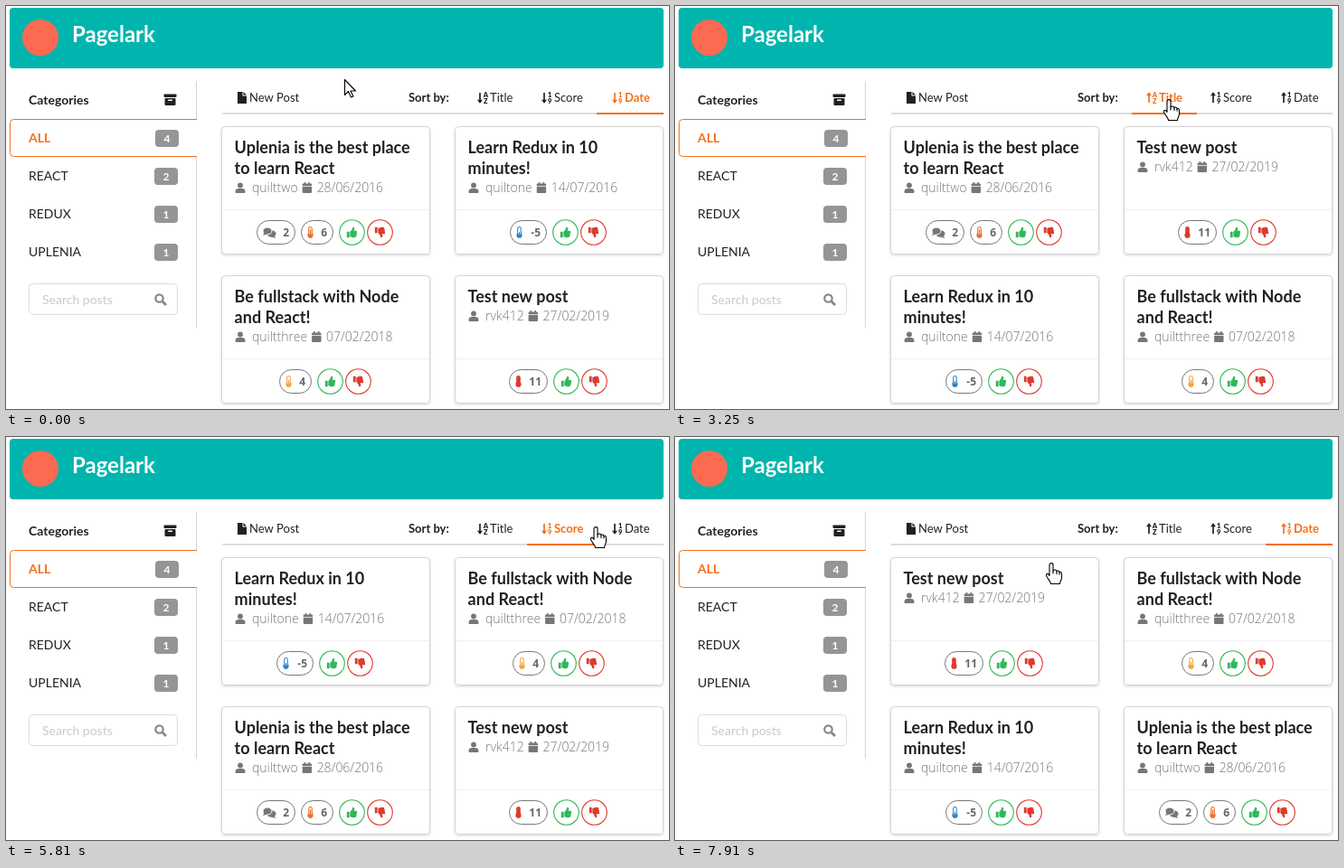
An HTML page with a canvas that plays this animation: 733 by 446 pixels, repeating every 7.99 s.

```html
<!DOCTYPE html>
<html lang="en">
<head>
<meta charset="utf-8">
<title>Post board</title>
<style>
html, body { margin: 0; width: 100%; height: 100%; overflow: hidden; background: #fff; }
canvas { display: block; width: 733px; height: 446px; }
</style>
</head>
<body>
<canvas id="stage"></canvas>
<script>
const W = 733, H = 446, LOOP = 7990;
const canvas = document.getElementById('stage');
const ctx = canvas.getContext('2d');
const ratio = window.devicePixelRatio || 1;
canvas.width = W * ratio;
canvas.height = H * ratio;

const ORANGE = '#f2711c', TEAL = '#00b5ad', INK = '#212121', LINE = '#d4d4d5';
const GREEN = '#2fb955', RED = '#de3a2e', GREY = '#767676';

const posts = [
  { lines: ['Uplenia is the best place', 'to learn React'], user: 'quilttwo', date: '28/06/2016', day: 20160628, score: 6, heat: '#e8702a', level: 0.75, comments: 2 },
  { lines: ['Learn Redux in 10', 'minutes!'], user: 'quiltone', date: '14/07/2016', day: 20160714, score: -5, heat: '#2b83c9', level: 0.4 },
  { lines: ['Be fullstack with Node', 'and React!'], user: 'quiltthree', date: '07/02/2018', day: 20180207, score: 4, heat: '#f2a440', level: 0.55 },
  { lines: ['Test new post'], user: 'rvk412', date: '27/02/2019', day: 20190227, score: 11, heat: RED, level: 1 }
];
const sortKeys = { title: p => p.lines[0], score: p => p.score, date: p => p.day };

const tabs = [
  { key: 'title', label: 'Title', marks: 'AZ', x: 521, from: 505, to: 577 },
  { key: 'score', label: 'Score', marks: '19', x: 592, from: 576, to: 654 },
  { key: 'date', label: 'Date', marks: '19', x: 670, from: 653, to: 727 }
];

// start time, sort key, descending
const sorts = [
  [0, 'date', false], [2550, 'title', false], [3250, 'title', true],
  [4570, 'score', true], [5350, 'score', false],
  [6590, 'date', false], [7280, 'date', true]
];
// mouse button down, button up, key, time the tab reacts
const presses = [
  [2310, 2400, 'title', 2550], [3010, 3180, 'title', 3250],
  [4340, 4490, 'score', 4570], [5110, 5280, 'score', 5350],
  [6360, 6510, 'date', 6590], [7050, 7200, 'date', 7280]
];
// first step, last step, step count, waypoints
const moves = [
  [150, 930, 11, [[375, 82], [550, 99]]],
  [1000, 1780, 11, [[550, 99], [536, 104], [604, 98], [659, 97], [573, 106]]],
  [1850, 1930, 2, [[573, 106], [547, 104]]],
  [3480, 3940, 7, [[547, 104], [612, 100]]],
  [4810, 4880, 2, [[612, 100], [615, 99]]],
  [5580, 6130, 8, [[615, 99], [653, 100], [685, 101]]],
  [7600, 7910, 5, [[685, 101], [417, 140]]]
];

const thumb = new Path2D('M0 224H128V512H0Z M160 235C200 195 220 160 250 125C280 95 275 0 312 0C350 0 384 20 384 81C384 120 358 148 350 176H450C490 176 512 205 512 234C512 255 505 272 492 284C500 310 498 340 483 363C490 395 482 420 467 438C470 500 430 512 345 512C260 512 220 465 160 464Z');
const hand = new Path2D('M-2.5 14V2C-2.5-.5 1.5-.5 1.5 2V8.5C2.5 7 5.5 7 5.5 9.5C6 8 8.5 8.2 8.5 10.5C9.5 9 11 10 11 12V16C11 19 9 20 9 23H-1C-1 20-6 16-6 13.5C-6 11-3.5 11.5-2.5 14Z');
const knuckles = new Path2D('M1.5 8V12M5.5 9.5V12.5M8.5 10.5V13');
const arrow = new Path2D('M0 0V17L4 13L7 19.5L9.5 18.5L6.5 12.5H12Z');

function text(str, x, y, size, color, weight = 400, align = 'left', family = 'Lato') {
  ctx.font = `${weight} ${size}px "${family}", sans-serif`;
  ctx.fillStyle = color;
  ctx.textAlign = align;
  ctx.fillText(str, x, y);
  return ctx.measureText(str).width;
}

function box(x, y, w, h, color) {
  ctx.fillStyle = color;
  ctx.fillRect(x, y, w, h);
}

function round(x, y, w, h, r, fill, stroke) {
  ctx.beginPath();
  ctx.roundRect(x, y, w, h, r);
  paint(fill, stroke);
}

function circle(x, y, r, fill, stroke) {
  ctx.beginPath();
  ctx.arc(x, y, r, 0, Math.PI * 2);
  paint(fill, stroke);
}

function paint(fill, stroke) {
  if (fill) { ctx.fillStyle = fill; ctx.fill(); }
  if (stroke) { ctx.strokeStyle = stroke; ctx.stroke(); }
}

function poly(points, fill, stroke) {
  ctx.beginPath();
  points.forEach(([x, y]) => ctx.lineTo(x, y));
  paint(fill, stroke);
}

function at(x, y, draw) {
  ctx.save();
  ctx.translate(x, y);
  draw();
  ctx.restore();
}

function fileIcon() {
  poly([[0, 0], [5.5, 0], [5.5, 4.5], [10, 4.5], [10, 13], [0, 13]], INK);
  poly([[6.5, 0], [10, 3.5], [6.5, 3.5]], INK);
}

function archiveIcon() {
  round(0, 0, 14, 3.5, 1, INK);
  round(1, 4.5, 12, 8, 1, INK);
  round(4.5, 6, 5, 1.5, 0.7, '#fff');
}

function userIcon() {
  circle(5.5, 3, 2.9, GREY);
  round(0, 6.5, 11, 5, [3.5, 3.5, 1, 1], GREY);
}

function calendarIcon() {
  box(2, 0, 1.6, 3, GREY);
  box(6.8, 0, 1.6, 3, GREY);
  round(0, 1.5, 10.4, 2.5, [1, 1, 0, 0], GREY);
  round(0, 4.7, 10.4, 7.3, [0, 0, 1, 1], GREY);
}

function commentsIcon() {
  ctx.beginPath();
  ctx.ellipse(9.5, 7, 5, 3.8, 0, 0, Math.PI * 2);
  paint(GREY);
  poly([[12, 9], [14.5, 12], [9, 10.5]], GREY);
  ctx.beginPath();
  ctx.ellipse(5, 4, 5, 4, 0, 0, Math.PI * 2);
  paint(GREY, '#fff');
  poly([[1.5, 6], [0, 9], [5, 7.5]], GREY);
}

function searchIcon() {
  ctx.lineWidth = 2.2;
  circle(5, 5, 4.2, null, '#7f8b8e');
  ctx.lineWidth = 2.8;
  poly([[8.5, 8.5], [12.5, 12.5]], null, '#7f8b8e');
}

function thermometer(color, level) {
  round(1.2, 0, 4.6, 10, 2.3, color);
  circle(3.5, 9.7, 3.1, color);
  if (level < 1) {
    round(2.3, 1.1, 2.4, 8, 1.2, '#fff');
    const top = 9.5 - 8 * level;
    box(2.9, top, 1.2, 10 - top, color);
  }
}

function sortIcon(x, marks, up, color) {
  at(x, 95, () => {
    ctx.lineWidth = 1.7;
    poly([[3, 1], [3, 12]], null, color);
    poly(up ? [[0, 4.2], [3, 0.2], [6, 4.2]] : [[0, 8.8], [3, 12.8], [6, 8.8]], color);
  });
  text(marks[0], x + 9.3, 101, 7.5, color, 900, 'center');
  text(marks[1], x + 9.3, 108, 7.5, color, 900, 'center');
}

function drawHeader() {
  round(4, 2, 723, 67, 4, TEAL);
  circle(38, 35, 20, '#fb6a51');
  text('Pagelark', 73, 40, 24, '#fff', 700);
}

function drawSidebar() {
  box(210, 83, 1, 42, LINE);
  box(210, 167, 1, 189, LINE);
  text('Categories', 25, 109, 14, INK, 700);
  at(174.5, 97.5, archiveIcon);

  ctx.lineWidth = 1;
  ctx.beginPath();
  ctx.moveTo(211, 125.5);
  ctx.arcTo(4.5, 125.5, 4.5, 166.5, 4);
  ctx.arcTo(4.5, 166.5, 211, 166.5, 4);
  ctx.lineTo(211, 166.5);
  paint(null, ORANGE);

  [['ALL', 4], ['REACT', 2], ['REDUX', 1], ['UPLENIA', 1]].forEach(([name, count], i) => {
    const y = 146 + i * 42;
    const left = i ? 164 : 165;
    text(name, 25, y + 5, 14, i ? INK : ORANGE, i ? 400 : 700);
    round(left, y - 9, 26, 19, 4, '#949596');
    text(count, left + 13, y + 5, 12, '#fff', 700, 'center');
  });

  ctx.lineWidth = 1;
  round(25.5, 307.5, 164, 34, 4, '#fff', '#dcdcdd');
  text('Search posts', 40, 330, 14, '#c9c9c9');
  at(164.5, 318.5, searchIcon);
}

function drawMenu(t, start, active, up) {
  at(256, 95, fileIcon);
  text('New Post', 269, 106, 13, INK);
  text('Sort by:', 445, 106, 13, INK, 700);
  box(239, 118, 488, 2, '#dededf');

  const fading = start > 0 && t - start < 75 && active !== keyBefore(start);
  for (const tab of tabs) {
    const on = tab.key === active;
    const held = presses.some(p => p[2] === tab.key && t >= p[0] && t < p[3]);
    const color = !on ? INK : fading ? '#cb6a2c' : ORANGE;
    sortIcon(tab.x, tab.marks, up, color);
    text(tab.label, tab.x + 14, 106, 13, color, on ? 700 : 400);
    if (on || held) box(tab.from, 118, tab.to - tab.from, 2, on ? ORANGE : '#b3b3b4');
  }
}

function keyBefore(time) {
  return sorts.filter(s => s[0] < time).pop()[1];
}

function drawPill(x, y, w, value) {
  ctx.lineWidth = 1;
  round(x + 0.5, y - 12.5, w - 1, 26, 13, '#fff', GREY);
  text(value, x + w - 7, y + 5, 12, '#666', 700, 'right', 'Open Sans');
}

function drawVote(x, y, color, flip) {
  ctx.lineWidth = 1.1;
  circle(x, y + 0.5, 13.8, '#fff', color);
  at(x, y + 0.5, () => {
    ctx.scale(11.4 / 512, (flip ? -11.4 : 11.4) / 512);
    ctx.translate(-256, -256);
    ctx.fillStyle = color;
    ctx.fill(thumb);
  });
}

function drawMeta(post, x, y) {
  const write = (str, left) => text(str, left, y, 14, GREY, 300, 'left', 'Open Sans');
  at(x, y - 10.5, userIcon);
  const end = x + 18.5 + write(post.user, x + 18.5);
  at(end + 5, y - 11, calendarIcon);
  write(post.date, end + 21);
}

function drawCard(post, x, y) {
  ctx.save();
  ctx.shadowColor = LINE;
  ctx.shadowBlur = 3 * ratio;
  ctx.shadowOffsetY = ratio;
  round(x, y, 231, 142, 4, '#fff');
  ctx.restore();
  ctx.lineWidth = 1;
  round(x + 0.5, y + 0.5, 230, 141, 4, '#fff', LINE);
  box(x + 1, y + 92, 229, 1, '#f0f0f0');

  post.lines.forEach((line, i) => text(line, x + 14.6, y + 30 + i * 23, 18, INK, 700));
  drawMeta(post, x + 15.5, y + 27 + post.lines.length * 23);

  const mid = y + 117;
  const scoreWidth = { '-5': 41, 11: 43 }[post.score] || 36;
  const extra = post.comments ? 49 : 0;
  let left = Math.round(x + 114.5 - (scoreWidth + extra + 66) / 2);
  if (extra) {
    drawPill(left, mid, 43, post.comments);
    at(left + 7, mid - 5, commentsIcon);
    left += extra;
  }
  drawPill(left, mid, scoreWidth, post.score);
  at(left + 7, mid - 6, () => thermometer(post.heat, post.level));
  left += scoreWidth;
  drawVote(left + 20.5, mid, GREEN, false);
  drawVote(left + 51.5, mid, RED, true);
}

function drawCards(key, down) {
  const value = sortKeys[key];
  const list = [...posts].sort((a, b) => value(a) < value(b) ? -1 : 1);
  if (down) list.reverse();
  list.forEach((post, i) => drawCard(post, 238 + (i % 2) * 258, 133 + (i >> 1) * 165));
}

function pointerAt(t) {
  let pos = moves[0][3][0];
  for (const [from, to, count, path] of moves) {
    if (t < from) break;
    const step = Math.min(count, Math.floor((t - from) / (to - from) * (count - 1) + 0.08) + 1);
    const u = step / count;
    const p = (path.length > 2 ? u : u * u * (3 - 2 * u)) * (path.length - 1);
    const i = Math.min(path.length - 2, Math.floor(p));
    pos = path[i].map((v, k) => Math.round(v + (path[i + 1][k] - v) * (p - i)));
  }
  return pos;
}

function drawPointer(t) {
  const [x, y] = pointerAt(t);
  if (presses.some(p => t >= p[0] && t < p[1])) {
    ctx.lineWidth = 1;
    circle(x, y, 11, null, '#000');
    circle(x, y, 10, null, '#fff');
  }
  at(x - 0.5, y - 0.5, () => {
    ctx.lineWidth = 1.1;
    ctx.lineJoin = 'round';
    ctx.fillStyle = '#fff';
    ctx.strokeStyle = '#000';
    const shape = x >= 505 || t > 7500 ? hand : arrow;
    ctx.fill(shape);
    ctx.stroke(shape);
    if (shape === hand) ctx.stroke(knuckles);
  });
}

function render(t) {
  ctx.setTransform(ratio, 0, 0, ratio, 0, 0);
  box(0, 0, W, H, '#fff');
  const [start, key, down] = sorts.filter(s => s[0] <= t).pop();
  drawHeader();
  drawSidebar();
  drawMenu(t, start, key, down);
  drawCards(key, down);
  drawPointer(t);
}

const begin = performance.now();
function tick() {
  render((performance.now() - begin) % LOOP);
  requestAnimationFrame(tick);
}
tick();
</script>
</body>
</html>
```
